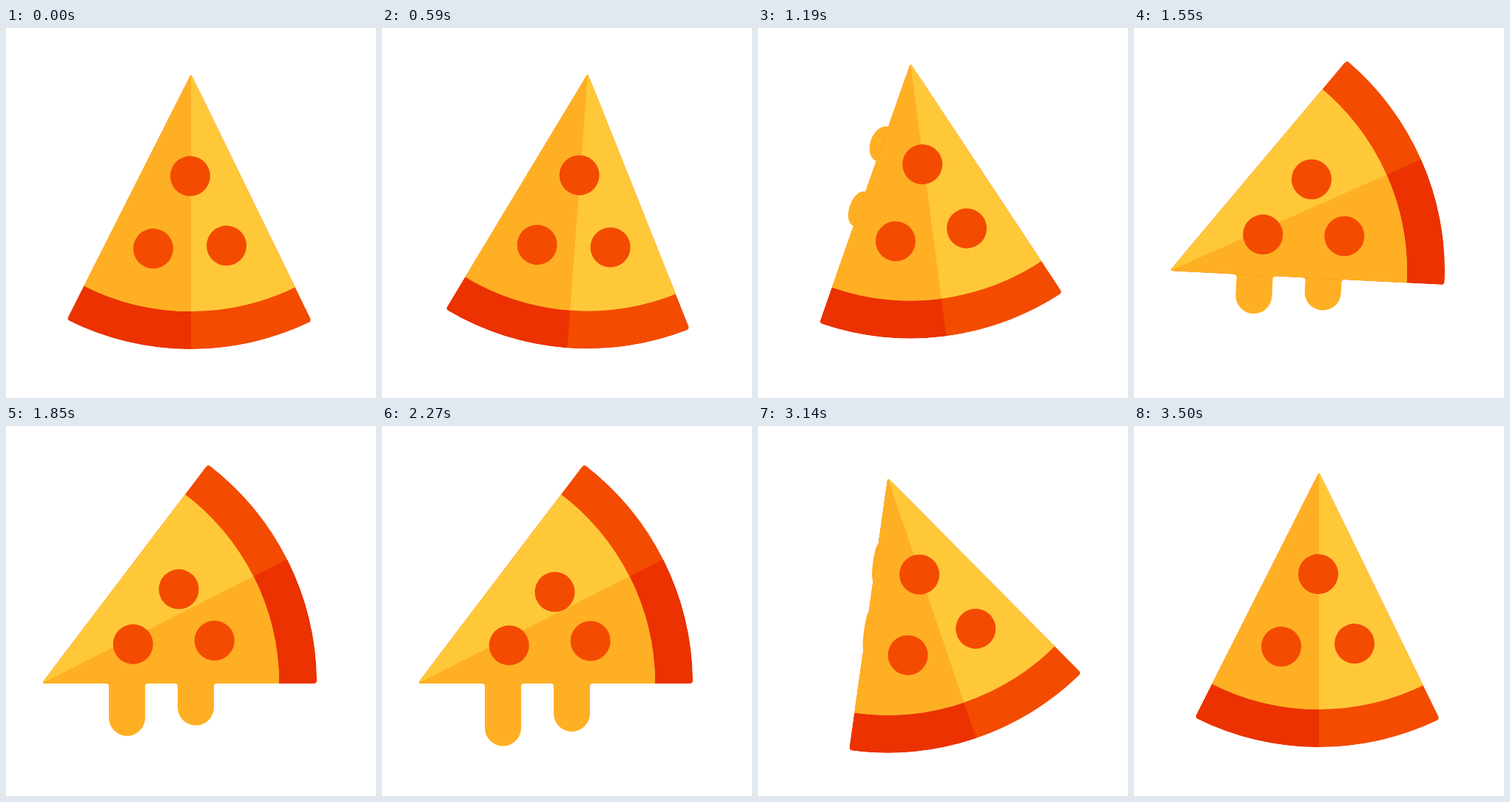
Recreate the animation shown at these times as an HTML page. Size 500 by 500 pixels, loop 3.53 s.

```html
<!DOCTYPE html>
<html lang="en">
<head>
<meta charset="utf-8">
<title>Rolling pizza slice</title>
<style>
  html, body { margin: 0; height: 100%; overflow: hidden; background: #fff; }
  svg { display: block; width: 100%; height: 100%; }
</style>
</head>
<body>
<svg viewBox="0 0 500 500">
  <clipPath id="outline"><path id="outlinePath"/></clipPath>
  <g id="slice">
    <g id="drips" fill="#ffaf23"><path/><path/></g>
    <g id="body" clip-path="url(#outline)"></g>
    <g id="toppings" fill="#f34b00"></g>
  </g>
</svg>
<script>
const LOOP = 3530;
const RADIUS = 372, CRUST = 321, MIDDLE = 26.8, SPREAD = 52.8;
const $ = id => document.getElementById(id);

// The slice lies flat on its dark edge: tip at 0,0 and that edge along +x.
const polar = (r, deg) => {
  const a = deg * Math.PI / 180;
  return [r * Math.cos(a), -r * Math.sin(a)];
};
const sector = (r, from, to) =>
  `M0 0L${polar(r, from)}A${r} ${r} 0 0 0 ${polar(r, to)}Z`;

function add(parent, tag, attrs) {
  const el = document.createElementNS('http://www.w3.org/2000/svg', tag);
  for (const name in attrs) el.setAttribute(name, attrs[name]);
  return parent.appendChild(el);
}

$('outlinePath').setAttribute('d',
  `M${polar(5, SPREAD)}Q0 0 5 0L${RADIUS - 5} 0Q${RADIUS} 0 ${polar(RADIUS, 0.7)}` +
  `A${RADIUS} ${RADIUS} 0 0 0 ${polar(RADIUS, SPREAD - 0.7)}` +
  `Q${polar(RADIUS, SPREAD)} ${polar(RADIUS - 5, SPREAD)}Z`);

// Light parts run under the dark ones so that no seam shows.
[
  [RADIUS, 0, SPREAD + 1, '#f34b00'],
  [RADIUS, -1, MIDDLE, '#eb3200'],
  [CRUST, 0, SPREAD + 1, '#ffc839'],
  [CRUST, -1, MIDDLE, '#ffaf23']
].forEach(([r, from, to, fill]) => add($('body'), 'path', { d: sector(r, from, to), fill }));

const toppings = [
  { x: 123.7, y: -61.3, slide: 10 },
  { x: 233.7, y: -60.9, slide: 3.5 },
  { x: 185.5, y: -147.5, slide: 24.5 }
];
for (const t of toppings) t.el = add($('toppings'), 'circle', { cx: t.x, r: 27 });

const drips = [
  { x: 115.5, length: 89, duration: 1900 },
  { x: 208.5, length: 66.3, duration: 1650 }
];
drips.forEach((d, i) => {
  d.el = $('drips').children[i];
  d.el.setAttribute('transform', `translate(${d.x})`);
});

// time, pivot x, pivot y, tilt
const [pivotX, pivotY] = polar(190, MIDDLE);
const keys = [
  [0, 250, 252, 116.8],
  [500, 250, 252, 116.8],
  [690, 290, 248, 129],
  [885, 332.7, 235.4, 141.3],
  [1040, 292, 237, 128.8],
  [1190, 230.8, 235.9, 109.5],
  [1320, 225, 251, 65],
  [1450, 221, 243, 5],
  [1550, 221.6, 251.2, 2.9],
  [1750, 217.6, 262.3, 0],
  [2660, 217.6, 262.3, 0],
  [2900, 209, 280.5, -5.1],
  [3065, 219, 257, 57],
  [3200, 247, 247, 116.4],
  [3330, 250, 252, 116.8],
  [LOOP, 250, 252, 116.8]
];

// Smooth slope through a key; flat at turning points.
function slope(i, c) {
  if (i === 0 || i === keys.length - 1) return 0;
  const rate = j => (keys[j + 1][c] - keys[j][c]) / (keys[j + 1][0] - keys[j][0]);
  const a = rate(i - 1), b = rate(i);
  return a * b <= 0 ? 0 : 2 * a * b / (a + b);
}

function pose(time, c) {
  const i = keys.findIndex((k, n) => n < keys.length - 1 && time < keys[n + 1][0]);
  const span = keys[i + 1][0] - keys[i][0];
  const p = (time - keys[i][0]) / span, q = 1 - p;
  return q * q * ((1 + 2 * p) * keys[i][c] + p * span * slope(i, c)) +
         p * p * ((1 + 2 * q) * keys[i + 1][c] - q * span * slope(i + 1, c));
}

const progress = (time, start, duration) =>
  Math.min(1, Math.max(0, (time - start) / duration));
const easeOut = p => 1 - (1 - p) ** 3;
const easeInOut = p => p * p * (3 - 2 * p);

function dripPath(length) {
  if (length < 0.1) return '';
  const w = 24.5, cap = Math.min(w, length), fillet = Math.min(4, length - cap);
  return `M${-w - fillet} -2V0Q${-w} 0 ${-w} ${fillet}V${length - cap}` +
    `A${w} ${cap} 0 0 0 ${w} ${length - cap}V${fillet}Q${w} 0 ${w + fillet} 0V-2Z`;
}

function draw(time) {
  const [x, y, tilt] = [1, 2, 3].map(c => pose(time, c));
  $('slice').setAttribute('transform',
    `translate(${x} ${y}) rotate(${tilt}) translate(${-pivotX} ${-pivotY})`);

  const melted = 1 - easeInOut(progress(time, 2930, 240));
  for (const d of drips) {
    const grown = easeOut(progress(time, 1070, d.duration));
    d.el.setAttribute('d', dripPath(d.length * grown * melted));
  }
  const slid = easeOut(progress(time, 1150, 1600)) * melted;
  for (const t of toppings) t.el.setAttribute('cy', t.y + t.slide * slid);
}

function tick() {
  draw(performance.now() % LOOP);
  requestAnimationFrame(tick);
}
tick();
</script>
</body>
</html>
```
